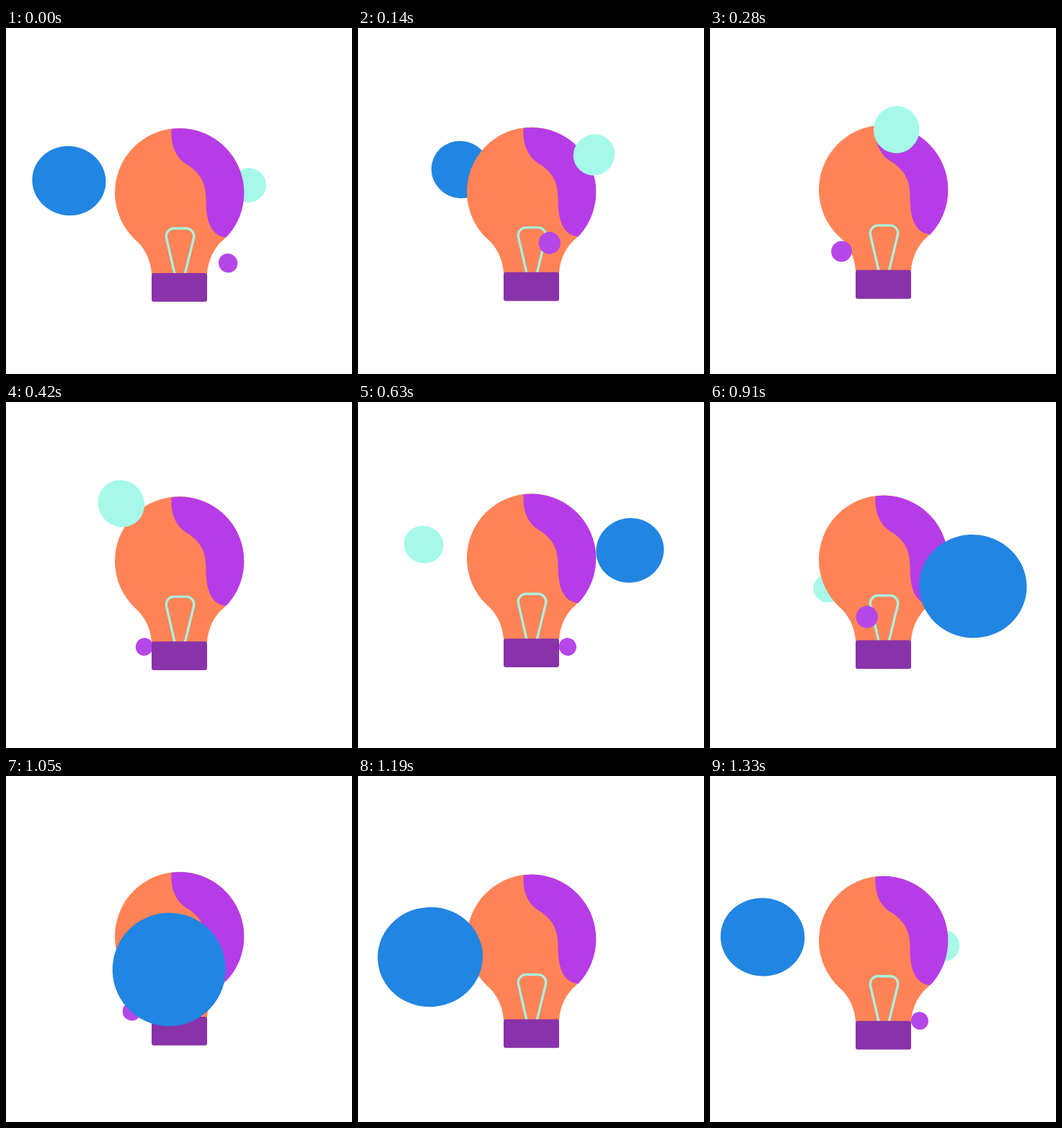
These frames come from a looping animation (480 px wide and 480 px high, 1400 ms). An HTML page with a canvas:

```html
<!DOCTYPE html>
<html lang="en">
<head>
<meta charset="utf-8">
<title>Light bulb with orbiting spheres</title>
<style>
  html, body { margin: 0; width: 100%; height: 100%; overflow: hidden; background: #fff; }
  canvas { display: block; width: 480px; height: 480px; }
</style>
</head>
<body>
<canvas id="stage" width="480" height="480"></canvas>
<script>
const ctx = document.getElementById('stage').getContext('2d');
const LOOP = 1400, STEP = 70, MID = 240, TAU = Math.PI * 2;
const FOCAL = MID / Math.tan(Math.PI / 6);

// Orbits in units of the camera distance; lift raises or lowers the near side.
const spheres = [
  { color: '#2185e2', size: .117, turns: 1, phase: 3.196, x: 0, y: -.0622, rx: .37, rz: .37, lift: .104 },
  { color: '#a6f9e9', size: .057, turns: 1, phase: 0, x: -.055, y: -.0525, rx: .2865, rz: .265, lift: -.131 },
  { color: '#b546e8', size: .0313, turns: 2, phase: 0, x: .0036, y: .2069, rx: .16, rz: .15, lift: -.0914 }
];

const body = new Path2D('M202 341 C201 322 192 304 179 293.5 A89.5 89.5 0 1 1 302 293.5 C289 304 280 322 279 341 Z');
const shade = new Path2D('M229.5 140 A89.5 89.5 0 0 1 305.5 290.6 C285 289 277 268 277.5 238 C277.5 214 269 201 252 190 C236 181 228 163 229.5 140 Z');
const filament = new Path2D('M234 341 L222.6 291.5 C221 284.5 226 278 233 278 H250 C257 278 262 284.5 260.4 291.5 L248.3 341');
const base = new Path2D();
base.roundRect(202, 340, 77, 39.8, 3);

function fill(path, color) {
  ctx.fillStyle = color;
  ctx.fill(path);
}

function drawBulb(turn) {
  ctx.save();
  ctx.translate(0, 6 * (Math.cos(turn) - 1));
  fill(body, '#ff8357');
  fill(shade, '#b63ce8');
  ctx.strokeStyle = '#a8f2de';
  ctx.lineWidth = 3.4;
  ctx.stroke(filament);
  fill(base, '#8833a9');
  ctx.restore();
}

// Perspective outline of a sphere: an ellipse stretched away from the centre.
function drawSphere({ color, size, x, y, depth }) {
  const off = Math.hypot(x, y), angle = Math.atan2(y, x);
  const k = depth * depth - size * size;
  const dist = FOCAL * off * depth / k;
  const major = FOCAL * size * Math.sqrt(off * off + k) / k;
  const minor = FOCAL * size / Math.sqrt(k);
  ctx.fillStyle = color;
  ctx.beginPath();
  ctx.ellipse(MID + dist * Math.cos(angle), MID + dist * Math.sin(angle), major, minor, angle, 0, TAU);
  ctx.fill();
}

function place(s, turn) {
  const a = turn * s.turns + s.phase, near = Math.sin(a);
  return {
    color: s.color,
    size: s.size,
    x: s.x + s.rx * Math.cos(a),
    y: s.y + s.lift * near,
    depth: 1 - s.rz * near
  };
}

function render(ms) {
  const turn = Math.floor(ms % LOOP / STEP) * STEP / LOOP * TAU;
  const items = spheres.map(s => place(s, turn)).concat({ bulb: true, depth: .985 });
  items.sort((a, b) => b.depth - a.depth);
  ctx.clearRect(0, 0, 480, 480);
  for (const item of items) item.bulb ? drawBulb(turn) : drawSphere(item);
}

const start = performance.now();
function tick() {
  render(performance.now() - start);
  requestAnimationFrame(tick);
}
tick();
</script>
</body>
</html>
```
